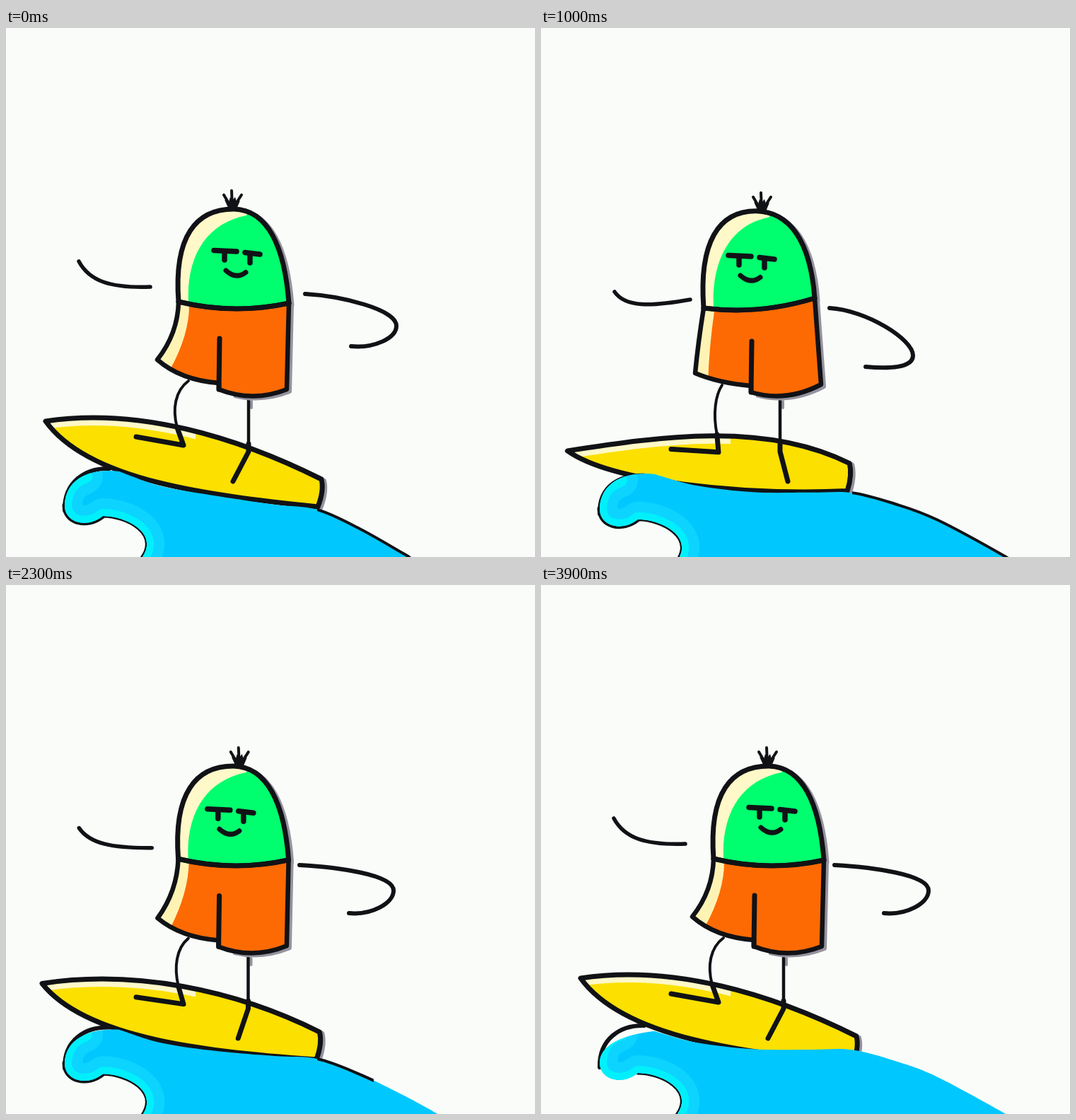
Animation of 748x748 px, one loop 4000 ms. Source, as an HTML page with a canvas:

```html
<!DOCTYPE html>
<html lang="en">
<head>
<meta charset="utf-8">
<title>Surfer</title>
<style>
  html, body { margin: 0; width: 100%; height: 100%; overflow: hidden; background: #fafcf9; }
  canvas { display: block; }
</style>
</head>
<body>
<canvas width="748" height="748"></canvas>
<script>
const ctx = document.querySelector('canvas').getContext('2d');
const INK = '#111216', SHADE = '#96939f', CREAM = '#fff8c8', PAPER = '#fafcf9';
const LOOP = 4000, STEP = 100;

const mix = (a, b, k) => a + (b - a) * k;
const blend = (a, b, k) => a.map((v, i) => mix(v, b[i], k));

// Eased 0 to 1 between two times.
function ease(t, from, to) {
  const u = Math.max(0, Math.min(1, (t - from) / (to - from)));
  return u * u * (3 - 2 * u);
}

// Each body part follows the same sway, with its own lag.
function pose(t) {
  const lean = ease(t, 0, 600);
  return {
    dome: lean - ease(t, 1000, 2450),
    hem: lean - ease(t, 1700, 2450),
    gaze: lean - ease(t, 1800, 2600),
    step: lean - ease(t, 1500, 2700),
    hair: ease(t, 1000, 1700) - ease(t, 2500, 3900),
    tilt: ease(t, 50, 1100) - ease(t, 1700, 2600),
    nose: ease(t, 50, 1100) - ease(t, 1200, 2700),
    swell: ease(t, 0, 1150) - .6 * ease(t, 1750, 2400) + .55 * ease(t, 2400, 3400),
    reach: ease(t, 0, 900),
    recover: ease(t, 1000, 2200),
    raise: ease(t, 2500, 3100) - ease(t, 3300, 3800),
    gap: 13 * ease(t, 2000, 3000),
    fade: ease(t, 1900, 2500),
    blink: Math.abs(t - 600) <= 100,
  };
}

function ink(d, width = 7, color = INK) {
  ctx.lineWidth = width;
  ctx.strokeStyle = color;
  ctx.stroke(new Path2D(d));
}

function fill(d, color) {
  ctx.fillStyle = color;
  ctx.fill(new Path2D(d));
}

function clipped(d, draw) {
  ctx.save();
  ctx.clip(new Path2D(d));
  draw();
  ctx.restore();
}

function shifted(x, y, draw) {
  ctx.save();
  ctx.translate(x, y);
  draw();
  ctx.restore();
}

const rect = (x, y, w, h) => `M${x} ${y}h${w}v${h}h${-w}Z`;

// Smooth curve through the points, continuing from the first one.
function through(p) {
  const at = i => p[Math.max(0, Math.min(p.length - 1, i))];
  return p.slice(1).map(([x, y], i) => {
    const [a, b, c] = [at(i - 1), at(i), at(i + 2)];
    return `C${b[0] + (x - a[0]) / 6} ${b[1] + (y - a[1]) / 6} ` +
      `${x - (c[0] - b[0]) / 6} ${y - (c[1] - b[1]) / 6} ${x} ${y}`;
  }).join('');
}

function drawBoard({ tilt, nose }) {
  const [nx, ax, ay, bx, by] = blend([56, 446, 638, 441, 677], [37, 436, 615, 433, 654], tilt);
  const ny = mix(556, 599, nose);
  const top = `M${nx} ${ny}C${nx + 130} ${ny - 20} ${ax - 120} ${ay - 60} ${ax} ${ay}`;
  const shape = `${top}Q${ax + 4} ${ay + 16} ${bx} ${by}C${bx - 150} 661 ${nx + 62} 642 ${nx} ${ny}Z`;
  clipped(rect(400, 500, 348, 248), () => shifted(4, 2, () => ink(shape, 6, SHADE)));
  fill(shape, '#fbe000');
  clipped(shape, () => clipped(rect(0, 500, 268, 248), () =>
    shifted(0, 6, () => ink(top, 10, CREAM))));
  ink(shape);
}

function drawWave({ swell, tilt, gap, fade }) {
  const crest = blend([627, 648, 662, 674, 681, 708, 742], [631, 647, 656, 656, 656, 671, 693], swell)
    .map((y, i) => [i ? 140 + 60 * i + 20 * (i < 2) : 160, y]);
  crest.slice(1).forEach((p, i) => p[0] = [220, 300, 380, 440, 500, 560][i]);
  const end = mix(570, 662, swell);
  const points = [...crest, [end, 748], [end + 12, 758]];
  const P = (x, y) => `${x} ${y + 5 * tilt} `;
  const throat = `M${P(190, 752)}C${P(220, 715)}${P(170, 690)}${P(137, 690)}`;
  const lip = `C${P(115, 708)}${P(83, 700)}${P(83, 675)}`;
  const top = `C${P(84, 634 + gap)}${P(125, 622 + gap)}160 ${crest[0][1]}`;
  const shape = `${throat}${lip}${top}${through(points)}Z`;

  const rise = 623 + 5 * tilt;
  ink(`M${P(83, 682)}C${P(82, 642)}${P(112, rise - 1)}${P(146, rise)}`, 6);
  ink(throat, 5);
  if (fade < 1) ink(`M${P(137, 690)}${lip}`, 7);
  fill(shape, '#00c8ff');
  clipped(shape, () => {
    const rim = throat + lip + `C${P(84, 650)}${P(96, 640)}${P(112, 634)}`;
    ink(rim, 50, '#0cd4ff');
    ink(rim, 20, '#00f0fb');
  });
  clipped(rect(440, 600, 308 * (1 - fade), 148), () =>
    ink(`M${crest[0].join(' ')}${through(points)}`, 4));
}

function drawLegs({ hem, tilt, step }) {
  const [ankle, heel, toe] = blend([242, 590, 578], [249, 600, 596], tilt);
  const hip = mix(258, 256, hem), hipY = mix(499, 505, hem), right = mix(343, 338, hem);
  const bend = mix(231, 239, tilt);
  shifted(4, 2, () => ink(`M${right} 526v9`, 4, SHADE));
  ink(`M${hip} ${hipY}C${bend + 8} ${hipY + 14} ${bend + 4} ${hipY + 40} ${ankle} ${heel - 25}`, 4);
  ink(`M${ankle} ${heel - 25}L251 ${heel}L184 ${toe}`);
  ink(`M${right} 520V594`, 4.5);
  ink(`M${right} 588V599L${mix(321, 349, step)} 641`);
}

function drawBody({ dome: lean, hem }) {
  const [lx, ly, tx, rx, ry] = blend([244, 387, 322, 400, 389], [230, 396, 304, 387, 382], lean);
  const [hx, hy, cx, cy, bx, by] = blend([214, 469, 301, 511, 397, 511], [218, 488, 297, 515, 396, 504], hem);
  const ty = 255.5 + (325 - tx) * .16;
  const bend = lx - 1 - 7 * hem;
  const waist = `Q${(lx + rx) / 2} 406 `;
  const dome = `M${lx} ${ly}C${lx - 7} ${ly - 93} ${tx - 53} ${ty} ${tx} ${ty}` +
    `C${tx + 48} ${ty + 1} ${rx - 6} ${ry - 80} ${rx} ${ry}`;
  const torso = `${dome}${waist}${lx} ${ly}Z`;
  const shorts = `M${lx} ${ly}Q${bend} ${(ly + hy) / 2 + 4} ${hx} ${hy}` +
    `Q${hx + 33} ${cy - 13} ${cx} ${cy - 9}V${cy}Q${(cx + bx) / 2} 530 ${bx} ${by}` +
    `L${rx} ${ry}${waist}${lx} ${ly}Z`;

  clipped(rect(tx, 200, 748, 400), () => shifted(4, 3, () => {
    ink(dome, 7, SHADE);
    ink(shorts, 6, SHADE);
  }));

  fill(torso, CREAM);
  clipped(torso, () => fill(`M${lx + 14} ${ly + 30}V${ly}C${lx + 11} ${ly - 65} ` +
    `${tx - 38} ${ty + 20} ${tx + 18} ${ty + 9}L${tx + 26} ${ty}H${rx + 20}V${ry + 40}Z`, '#00ff6e'));

  fill(shorts, '#fff3b4');
  clipped(shorts, () => fill(`M${lx + 15} ${ly - 10}V${ly + 5}` +
    `Q${bend + 16} ${(ly + hy) / 2 + 6} ${hx + 18} ${hy + 14}V560H440V${ly - 10}Z`, '#fd6a04'));

  ink(shorts, 6.5);
  ink(dome);
  ink(`M${lx} ${ly}${waist}${rx} ${ry}`);
  ink(`M${cx + 1} ${cy - 72}L${cx} ${cy}`);
}

function drawHead({ dome, gaze, hair, blink }) {
  shifted(320 - 8 * dome + 10 * hair, 253 + 3 * dome, () => {
    ink('M-2 0L-12 -17M0 0L-1 -23M2 0L13 -17', 4);
    fill('M-5 3L-11 -10L-5 -7L-3 -14L0 -9L4 -14L6 -7L11 -9L6 3Z', INK);
  });
  shifted(mix(294, 265, gaze), mix(315, 322, gaze), () => {
    ink('M0 -.5L32 1M44 2.5L65 5', 7.5);
    if (!blink) ink('M15 2V13M51 6V17', 7.5);
    ink('M17 28Q31 41 45 30.5');
  });
}

function drawArms({ dome, gaze, raise, reach, recover }) {
  const low = [104, 373, 119, 382 + 13 * dome, 155, 381 + 13 * dome, 211, 384];
  const hang = blend([103, 330, 118, 358, 148, 368, 204, 366], low, gaze);
  const [a, b, c, d, e, f, g, h] = blend(hang, [170, 291, 155, 322, 172, 345, 208, 367], raise);
  ink(`M${a} ${b}C${c} ${d} ${e} ${f} ${g} ${h}`, 5.5);

  const swing = blend([423, 376, 552, 421, 488, 450], [408, 396, 526, 463, 459, 479], reach);
  const [sx, sy, ex, ey, x, y] = blend(swing, [415, 396, 548, 432, 485, 464], recover);
  ink(`M${sx} ${sy}C${sx + 52} ${sy + 3} ${ex} ${ey - 23} ${ex} ${ey}` +
    `C${ex} ${ey + 18} ${x + 32} ${y + 3} ${x} ${y}`, 6);
}

function frame() {
  const now = pose(Math.floor(performance.now() % LOOP / STEP) * STEP);
  ctx.fillStyle = PAPER;
  ctx.fillRect(0, 0, 748, 748);
  ctx.lineCap = ctx.lineJoin = 'round';
  for (const draw of [drawBoard, drawWave, drawLegs, drawBody, drawHead, drawArms]) draw(now);
  requestAnimationFrame(frame);
}
frame();
</script>
</body>
</html>
```
